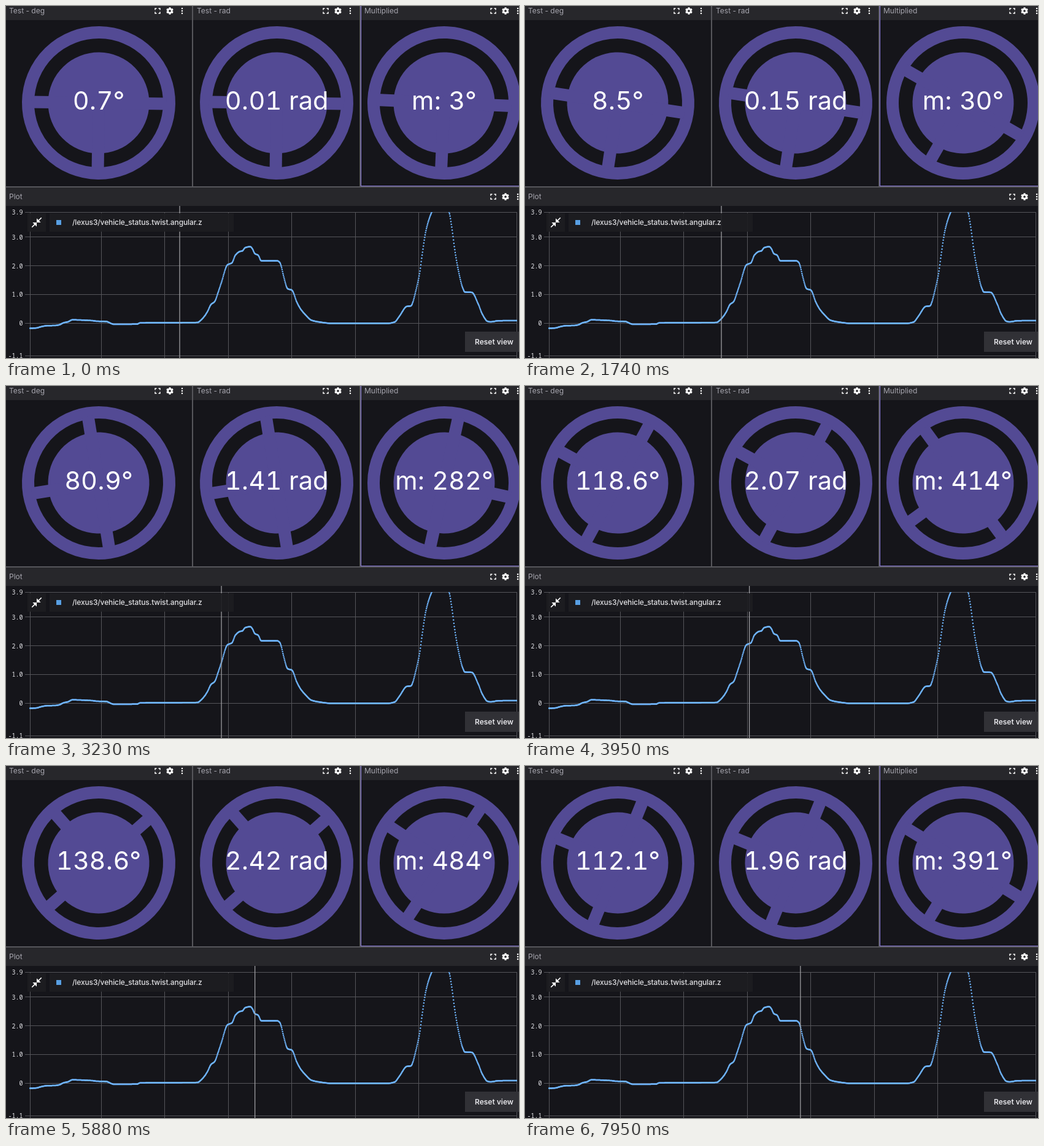
Recreate the animation shown at these times as an HTML page with a canvas. Size 836x574 px, loop 8 s.

```html
<!DOCTYPE html>
<html lang="en">
<head>
<meta charset="utf-8">
<title>Wheel panels</title>
<style>
html, body { margin: 0; width: 836px; height: 574px; overflow: hidden; background: #15151a; }
canvas, svg { position: absolute; left: 0; top: 0; }
text { font-family: Inter, sans-serif; font-size: 12px; font-optical-sizing: none; white-space: pre; }
.title { fill: #a7a6af; }
.read { font-size: 41.5px; fill: #fff; text-anchor: middle; }
.num { font-feature-settings: "tnum"; }
.axis { font-family: "Noto Sans Mono", monospace; font-size: 10px; font-weight: 500; fill: #e4e4e8; text-anchor: end; }
.legend { font-weight: 500; fill: #e1e1e4; letter-spacing: -0.12px; }
.button { font-weight: 600; fill: #e6e6ea; }
</style>
</head>
<body>
<canvas id="stage" width="836" height="574"></canvas>
<svg id="labels" width="836" height="574"></svg>
<script>
const W = 836, H = 574, LOOP = 8000;
const BG = '#15151a', HEADER = '#27272b', DIVIDER = '#56565b', GRID = '#55555a';
const PURPLE = '#534a94', LINE = '#6fb4fb';
const ZERO = 517, UNIT = 46.8;

// Playhead: time in ms, x
const playhead = [[0, 283], [920, 302.8], [2410, 334], [3230, 351],
  [4720, 381.2], [5880, 405.6], [7950, 448.8], [8000, 449.8]];

// Plotted signal: x, y
const signal = [
  [39, 525.5], [50, 525], [55, 523.5], [67, 521.3], [80, 521], [87, 519.8], [94, 516.5],
  [101, 515], [108, 511.8], [140, 513], [148, 514], [163, 514.5], [176, 519], [213, 518.8],
  [219, 516.7], [302.8, 516.27], [312, 516], [318, 512], [328, 499], [334, 486.8],
  [340, 482], [346, 466], [351, 451], [361, 422], [368, 419], [374, 406], [381.2, 400.3],
  [385, 399.5], [390, 394], [398, 392.5], [401, 395], [405.6, 403.8], [411, 406.5],
  [416, 415.5], [442, 415.5], [446, 418], [448.8, 425.35], [452, 439], [459, 461],
  [466, 463.5], [474, 483], [480, 494], [488, 503.5], [498, 512.5], [512, 515.5],
  [530, 517.5], [622, 517.5], [633, 515.5], [641, 506], [653, 490], [660, 489],
  [663, 483], [667, 468], [674, 436], [678, 407], [684, 368], [690, 346], [695, 334],
  [709, 318], [722, 336], [726, 358], [732, 402], [738, 435], [744, 459], [748, 466.5],
  [759, 467], [770, 487], [776, 502], [785, 514.3], [790, 515], [803, 513.2], [833, 513]];

const wheels = [
  { x: 151, angle: v => v * 180 / Math.PI, label: a => a.toFixed(1) + '°' },
  { x: 441, angle: v => v * 180 / Math.PI, label: (a, v) => v.toFixed(2) + ' rad' },
  { x: 714, angle: v => v * 200, label: a => 'm: ' + a.toFixed(0) + '°' }
];

const ctx = document.getElementById('stage').getContext('2d');
const svg = document.getElementById('labels');

function segment(points, x) {
  let i = 0;
  while (i < points.length - 2 && x > points[i + 1][0]) i++;
  return i;
}

function lerpAt(points, x) {
  const i = segment(points, x), [x0, y0] = points[i], [x1, y1] = points[i + 1];
  return y0 + (y1 - y0) * (x - x0) / (x1 - x0);
}

// Monotone cubic through the signal points
const secant = i => (signal[i + 1][1] - signal[i][1]) / (signal[i + 1][0] - signal[i][0]);
const slopes = signal.map((p, i) => {
  if (i === 0 || i === signal.length - 1) return 0;
  const a = secant(i - 1), b = secant(i);
  return a * b <= 0 ? 0 : 2 * a * b / (a + b);
});

function signalY(x) {
  const i = segment(signal, x), [x0, y0] = signal[i], [x1, y1] = signal[i + 1];
  const h = x1 - x0, s = (x - x0) / h, r = 1 - s;
  return y0 * (1 + 2 * s) * r * r + y1 * s * s * (3 - 2 * s)
    + h * s * r * (slopes[i] * r - slopes[i + 1] * s);
}

function box(c, color, x, y, w, h) {
  c.fillStyle = color;
  c.fillRect(x, y, w, h);
}

function addText(cls, x, y, str) {
  const el = document.createElementNS('http://www.w3.org/2000/svg', 'text');
  el.setAttribute('class', cls);
  el.setAttribute('x', x);
  el.setAttribute('y', y);
  el.textContent = str;
  svg.append(el);
  return el;
}

function drawIcons(c, x, y) {
  c.strokeStyle = c.fillStyle = '#fff';
  c.lineWidth = 1.5;
  c.beginPath();
  for (const sx of [-1, 1]) for (const sy of [-1, 1]) {
    c.moveTo(x + sx * 4, y + sy * 1.5);
    c.lineTo(x + sx * 4, y + sy * 4);
    c.lineTo(x + sx * 1.5, y + sy * 4);
  }
  c.stroke();

  c.save();
  c.translate(x + 20, y);
  c.lineWidth = 2.7;
  c.beginPath();
  c.arc(0, 0, 3.2, 0, 7);
  c.stroke();
  for (let i = 0; i < 6; i++) {
    c.fillRect(-1.5, -5.8, 3, 2.5);
    c.rotate(Math.PI / 3);
  }
  c.restore();

  for (const dy of [-4, 0, 4]) {
    c.beginPath();
    c.arc(x + 40, y + dy, 1.25, 0, 7);
    c.fill();
  }
}

function drawBase(c) {
  box(c, BG, 0, 0, W, H);
  box(c, HEADER, 0, 0, W, 23);
  box(c, HEADER, 0, 296, W, 30);
  box(c, DIVIDER, 303, 0, 2, 294);
  box(c, DIVIDER, 576, 0, 2, 294);
  box(c, DIVIDER, 0, 294, W, 2);
  box(c, '#8f7fe0', 578, 0, 1, 294);
  box(c, '#8f7fe0', 578, 293, W - 578, 1);
  for (const [x, y] of [[247, 8], [521, 8], [794, 8], [794, 311]]) drawIcons(c, x, y);

  for (const y of [336, 376, 423, 470, 517, 570]) box(c, GRID, 31, y, 802, 1);
  for (const x of [39, 155, 258, 362, 465, 569, 672, 832]) box(c, GRID, x, 336, 1, H - 336);

  c.save();
  c.beginPath();
  c.rect(38, 336, 795, 234);
  c.clip();
  c.fillStyle = LINE;
  for (let x = 39; x <= 833; x += 0.7) {
    c.beginPath();
    c.arc(x, signalY(x), 1.25, 0, 7);
    c.fill();
  }
  c.restore();
}

const shrinkIcon = new Path2D('M22 3.4 16.7 8.7 20 12H12V4L15.3 7.3 20.6 2ZM3.4 22 8.7 16.7 12 20V12H4L7.3 15.3 2 20.6Z');

function drawOverlays() {
  const panel = 'rgba(29,29,33,0.92)';
  box(ctx, panel, 35, 338, 30, 30);
  box(ctx, panel, 71, 338, 300, 30);
  box(ctx, '#589fe3', 82, 349, 8, 8);
  box(ctx, '#313136', 748, 531, 88, 33);
  ctx.save();
  ctx.translate(40, 343);
  ctx.scale(5 / 6, 5 / 6);
  ctx.fillStyle = '#fff';
  ctx.fill(shrinkIcon);
  ctx.restore();
}

function drawWheel(x, deg) {
  ctx.save();
  ctx.translate(x, 158);
  ctx.rotate(deg * Math.PI / 180);
  ctx.fillStyle = ctx.strokeStyle = PURPLE;
  ctx.lineWidth = 20;
  ctx.beginPath();
  ctx.arc(0, 0, 115, 0, 7);
  ctx.stroke();
  ctx.beginPath();
  ctx.arc(0, 0, 82.5, 0, 7);
  ctx.fill();
  ctx.fillRect(-110, -10, 220, 20);
  ctx.fillRect(-10, 0, 20, 110);
  ctx.restore();
}

addText('title', 5, 12, 'Test - deg');
addText('title', 311, 12, 'Test - rad');
addText('title', 584, 12, 'Multiplied');
addText('title', 5, 315, 'Plot');
addText('legend', 108, 357, '/lexus3/vehicle_status.twist.angular.z');
addText('button', 764, 552, 'Reset view');
for (const [str, y] of [['3.9', 336], ['3.0', 377], ['2.0', 424], ['1.0', 470], ['0', 517], ['-1.1', 570]])
  addText('axis', 27.5, y + 3.5, str);
for (const w of wheels) w.text = addText('read', w.x, 169, '');

const base = document.createElement('canvas');
base.width = W;
base.height = H;
drawBase(base.getContext('2d'));

function render(t) {
  const x = lerpAt(playhead, t);
  const value = (ZERO - signalY(x)) / UNIT;
  ctx.drawImage(base, 0, 0);
  for (const w of wheels) {
    const deg = w.angle(value);
    drawWheel(w.x, deg);
    const str = w.label(deg, value);
    if (str !== w.shown) {
      w.shown = str;
      w.text.innerHTML = str.replace(/\d+/g, '<tspan class="num">$&</tspan>');
    }
  }
  box(ctx, '#a0a0a4', x - 0.6, 326, 1.25, H - 326);
  drawOverlays();
}

const start = performance.now();
function tick() {
  render((performance.now() - start) % LOOP);
  requestAnimationFrame(tick);
}
tick();
</script>
</body>
</html>
```
